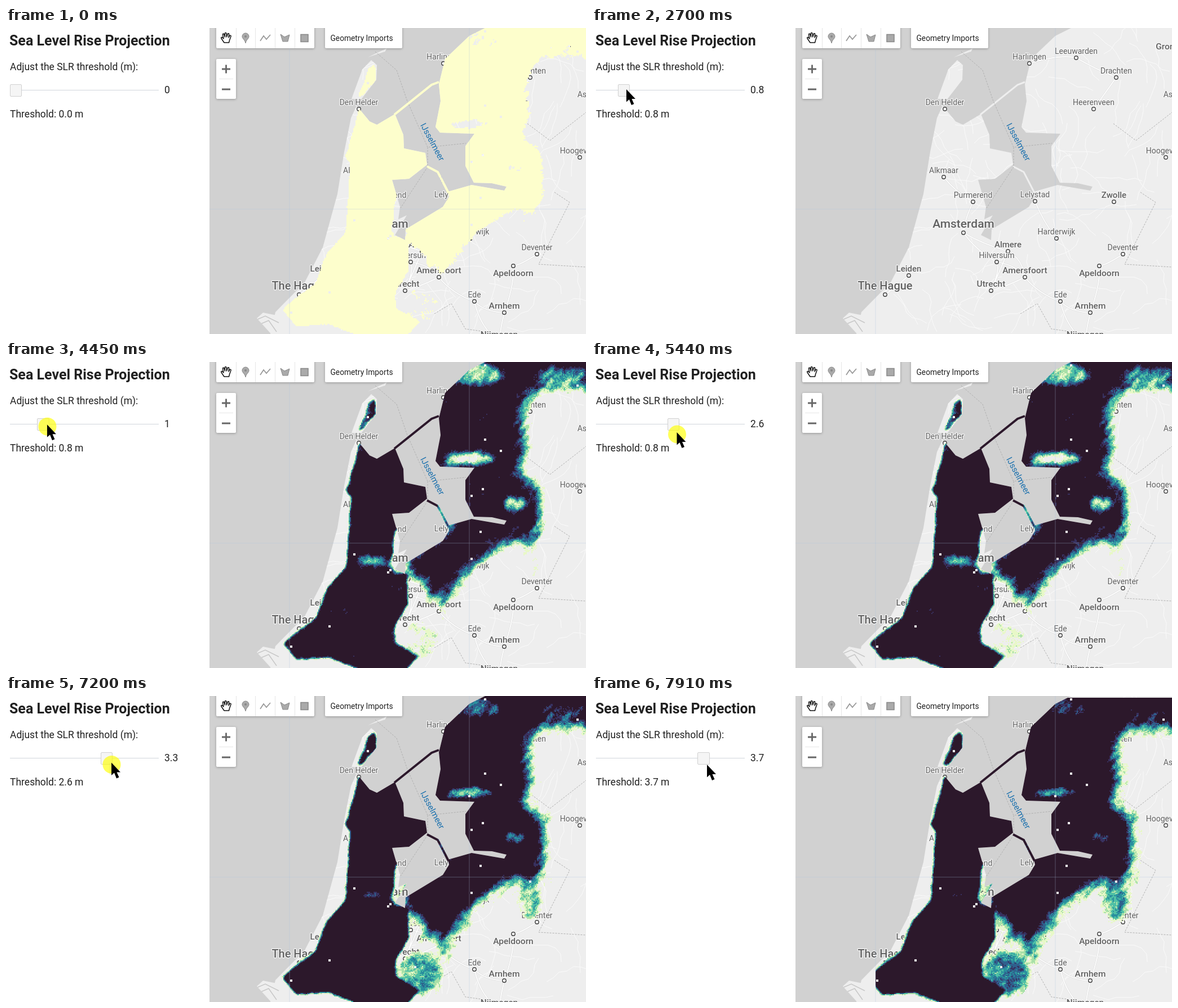
An HTML page with a canvas that plays this animation: 1029 px wide and 544 px high, repeating every 8000 ms.

```html
<!DOCTYPE html>
<html lang="en">
<head>
<meta charset="utf-8">
<title>Sea Level Rise Projection</title>
<style>
html, body { margin: 0; width: 100%; height: 100%; overflow: hidden; background: #fff; }
body { position: relative; font: 17.5px Roboto, sans-serif; color: #212121; }
#map, #flood, #top { position: absolute; left: 0; top: 0; width: 1029px; height: 544px; }
#panel { position: absolute; left: 0; top: 0; width: 360.5px; height: 544px; background: #fff; }
#panel > * { position: absolute; white-space: pre; line-height: 24px; margin: 0; left: 7px; }
#panel h1 { font-size: 25px; font-weight: 700; top: 11px; left: 6px; }
#track { top: 109.5px; width: 264px; height: 1.25px; background: #d0d5dc; }
#panel #knob { top: 99.5px; width: 19.5px; height: 20px; background: #f5f5f5; border: 1.25px solid #d0d0d0; border-radius: 2px; }
.box { position: absolute; background: #fff; border-radius: 2px; box-shadow: 0 1px 4px rgba(0,0,0,.3); }
</style>
</head>
<body>
<svg id="map" viewBox="0 0 1029 544"></svg>
<canvas id="flood" width="1029" height="544"></canvas>
<div class="box" style="left:373px;top:-4px;width:174px;height:40px"></div>
<div class="box" style="left:566px;top:-4px;width:137px;height:40px"></div>
<div class="box" style="left:373px;top:55px;width:35px;height:71px"></div>
<div id="panel">
  <h1>Sea Level Rise Projection</h1>
  <div style="top:57px">Adjust the SLR threshold (m):</div>
  <div id="track"></div>
  <div id="knob"></div>
  <div id="value" style="top:98px;left:281px">0</div>
  <div id="label" style="top:141px">Threshold: 0.0 m</div>
</div>
<svg id="top" viewBox="0 0 1029 544">
  <path d="M503 36V544M822 0V544M361 322H1029" stroke="#a9c0dc" stroke-opacity=".35"/>
  <path d="M408.5 0V36M442.5 0V36M477.5 0V36M512.5 0V36M378 90.5H403" stroke="#e6e6e6"/>
  <path d="M383 73H398M390.5 65.5V80.5M383 109H398" stroke="#666" stroke-width="2.8"/>
  <path d="M387 26L382 18.5Q381 16 383.500 16.500L386 19L384.5 12Q384.500 9.500 386.500 10.500L388.500 16L388.300 9.500Q389.500 7.500 391 9.500L391.500 16L393.500 10Q395.500 9 395.700 11L395 17L397 13.500Q399.500 12.500 399 15L396.500 22L395.500 26Z" fill="#fff" stroke="#111" stroke-width="1.5" stroke-linejoin="round"/>
  <path d="M425 27C424 21 419 19 419 15A6 6 0 0 1 431 15C431 19 426 21 425 27Z" fill="#aaa" stroke="#888"/>
  <circle cx="425" cy="15" r="2" fill="#888"/>
  <path d="M451 23L457 14L462 20L469 12" fill="none" stroke="#999" stroke-width="1.8"/>
  <path d="M487 11L494 16L503 12L500 24L491 24Z" fill="#aaa" stroke="#888"/>
  <path d="M523 11.5H536V24.5H523Z" fill="#aaa" stroke="#888" stroke-width="1.5"/>
  <text x="575.5" y="22.5" font-size="13.75" fill="#212121">Geometry Imports</text>
  <g id="mouse">
    <circle id="halo" cx=".5" cy="3.5" r="16" fill="#ff0" fill-opacity=".65"/>
    <path d="M0 0V22.5L5 18L9 28L13.5 26L9.5 17H16Z"/>
  </g>
</svg>
<script>
const W = 1029, H = 544, LOOP = 8000;
const $ = id => document.getElementById(id);

// ---------- geography: a few key points, roughened by noise ----------
const LAND = `M468 548L478 505L530 452L562 390L588 295L600 220L612 160L622 138
  L645 166L658 172L690 153L705 190L706 214L744 222L747 243L715 268L685 270L699 318L696 340L711 333L690 368L708 377
  L709 358L775 318L786 300L784 291L826 279L884 289L888 282L862 276L830 275L815 245V210L831 188L770 186L762 176
  L771 130L768 100L779 55L822 14L850 0V-9H1040V550Z
  M613 126L632 74L648 57L658 66L657 92L630 127Z M642 52L676 36L672 42Z
  M445 516L456 506L486 512L490 548H474Z`;
const DIKES = 'M689 154L755 101L768 96M747 246L766 256L785 293';
const WEST = `M712 378L685 362L690 305L700 290L765 265V215L700 140L626 143L612 200L602 228L611 240L605 340L603 362
  L570 402L548 455L490 500L515 530L572 526L660 560H700L732 524L692 500L690 470L714 430Z`;
const EAST = `M1080 -60H760L700 60V200H800V280L700 350V374L738 392L755 434L780 427L802 408L806 386L850 350L905 316
  L945 335L950 290V220L905 190L930 148L918 96L930 55L1000 44L1080 70Z`;
const TEXEL = 'M624 122L642 72L655 64L657 92L632 122Z';
// x, y, rx, ry, amount: low ground is added, high ground taken away
const LOW = [[735, 492, 38, 40, .35], [780, 448, 12, 28, .3], [930, 365, 22, 35, .3]];
const HIGH = [[835, 22, 48, 20, .5], [648, 353, 28, 9, .5], [822, 172, 45, 10, .75], [903, 253, 20, 12, .6],
  [985, 25, 50, 16, .35], [632, 95, 12, 30, .35], [695, 362, 12, 14, .9]];
const RAMP = ['#e8f8c8', '#a8e0a8', '#4fc0a5', '#2a8f9e', '#2f608d', '#38315f', '#2c182b']
  .map(c => [1, 3, 5].map(i => parseInt(c.slice(i, i + 2), 16)));

// name, x and y of the dot, text size, text drop below the dot (negative: above)
const CITIES = [['Den Helder', 626, 144], ['Harlingen', 776, 63], ['Leeuwarden', 859, 53], ['Drachten', 930, 88], ['Groningen', 1036, 45, 15.5],
  ['Assen', 1033, 130], ['Heerenveen', 890, 144], ['Hoogeveen', 1018, 230], ['Alkmaar', 624, 265], ['Purmerend', 676, 309],
  ['Lelystad', 786, 308], ['Zwolle', 926, 309, 15], ['Amsterdam', 659, 364, 21], ['Almere', 738, 397, 15], ['Hilversum', 718, 416],
  ['Amersfoort', 768, 443, 15.5], ['Utrecht', 708, 467, 15.5], ['Harderwijk', 824, 374], ['Deventer', 942, 402],
  ['Apeldoorn', 900, 423, 15.5, 18], ['Ede', 831, 486], ['Arnhem', 884, 506, 15.5], ['Nijmegen', 875, 557, 15.5],
  ['Leiden', 562, 440, 15], ['The Hague', 520, 474, 20]];

// ---------- noise ----------
function hash(x, y) {
  let n = Math.imul(x, 374761393) + Math.imul(y, 668265263);
  n = Math.imul(n ^ n >>> 13, 1274126177);
  return ((n ^ n >>> 16) >>> 0) / 4294967296;
}
function noise(x, y) {
  const i = Math.floor(x), j = Math.floor(y), u = x - i, v = y - j;
  const a = hash(i, j), b = hash(i + 1, j), c = hash(i, j + 1), d = hash(i + 1, j + 1);
  return a + (b - a) * u + (c - a + (a - b - c + d) * u) * v;
}

// ---------- base map ----------
const line = (d, w, c, extra = '') => `<path d="${d}" fill="none" stroke="${c}" stroke-width="${w}" ${extra}/>`;

function minorRoads() {
  let d = '';
  for (let i = 0; i < 130; i++) {
    let x = 540 + hash(i, 1) * 490, y = hash(i, 2) * 544, a = hash(i, 3) * 6.28;
    d += `M${x | 0} ${y | 0}`;
    for (let k = 0; k < 6; k++) {
      a += (hash(i, 10 + k) - .5) * 1.3;
      x += Math.cos(a) * 14; y += Math.sin(a) * 14;
      d += `L${x | 0} ${y | 0}`;
    }
  }
  return d;
}

// motorways join neighbouring cities with a slight bend
function motorways() {
  let d = '';
  CITIES.forEach(([, x, y], i) => CITIES.slice(0, i).forEach(([, p, q], j) => {
    if (Math.hypot(x - p, y - q) > 88) return;
    const bend = () => (hash(i, j) - .5) * 24;
    d += `M${x} ${y}Q${(x + p) / 2 + bend()} ${(y + q) / 2 - bend()} ${p} ${q}`;
  }));
  return d;
}

const dot = ([, x, y]) => `<circle cx="${x}" cy="${y}" r="3.2" fill="#fff" stroke="#444" stroke-width="1.4"/>`;
const name = ([s, x, y, size = 14, drop = -7]) =>
  `<text x="${x}" y="${y + (size > 16 ? drop - 2 : drop)}" font-size="${size}" font-weight="${size > 14 ? 500 : 400}">${s}</text>`;

$('map').innerHTML = `<rect width="${W}" height="${H}" fill="#d1d1d1"/><clipPath id="land"><path d="${LAND}"/></clipPath>
  <path d="${LAND}" fill="#eee"/>${line(DIKES, 3, '#eee')}
  <g clip-path="url(#land)">${line(minorRoads(), 1, '#fafafa')}${line(motorways(), 3, '#dedede')}${line(motorways(), 1.7, '#fff')}
  ${line('M446 518L460 512L484 524M452 526L466 520L480 540', 1.5, '#c8c8c8')}</g>
  ${line('M655 42L693 75L712 130L748 212L816 205M748 212V247L700 320M925 170L965 200L1029 150M973 292L1000 310L945 420L1029 425M760 508L790 490L815 535L880 544', 1, '#b0b0b0', 'stroke-dasharray="3 2"')}
  ${CITIES.map(dot).join('')}
  <g fill="#616161" stroke="#f5f5f5" stroke-width="2.5" stroke-linejoin="round" paint-order="stroke" text-anchor="middle">${CITIES.map(name).join('')}</g>
  <text transform="translate(752 205) rotate(62)" text-anchor="middle" font-size="15" fill="#1a70ae">IJsselmeer</text>`;

// ---------- flood: one ground field, read at a rising level ----------
function canvas(w, h) {
  const c = document.createElement('canvas');
  c.width = w; c.height = h;
  return c;
}
const fw = W + 1 >> 1, fh = H >> 1;

function groundField() {
  const g = canvas(fw, fh).getContext('2d');
  const soft = (px, shape, alpha = 1) => {
    g.filter = `blur(${px}px)`;
    g.globalAlpha = alpha;
    g.fill(shape);
  };
  const spot = ([x, y, rx, ry, amount]) => {
    const p = new Path2D();
    p.ellipse(x, y, rx, ry, 0, 0, 7);
    soft(3, p, amount);
  };
  g.scale(.5, .5);
  g.lineWidth = 4;
  soft(8, new Path2D(EAST));
  soft(1.5, new Path2D(WEST));
  soft(1, new Path2D(TEXEL));
  g.stroke(new Path2D(DIKES));
  LOW.forEach(spot);
  g.globalCompositeOperation = 'destination-out';
  HIGH.forEach(spot);

  return g.getImageData(0, 0, fw, fh).data.filter((_, i) => i % 4 === 3);
}

function landMask() {
  const c = canvas(W, H), g = c.getContext('2d');
  g.lineWidth = 4;
  g.fill(new Path2D(LAND));
  g.stroke(new Path2D(DIKES));
  return c;
}

const ground = groundField(), mask = landMask();

function floodLayer({ rise }) {
  const small = canvas(fw, fh), s = small.getContext('2d'), img = s.createImageData(fw, fh);
  for (let i = 0; i < fw * fh; i++) {
    const x = i % fw, y = i / fw | 0, a = ground[i] / 255;
    const rough = hash(x, y) * .2 + noise(x / 3, y / 3) * .35 + noise((x + y) / 5, (x - y) / 16) * .45 - .5;
    const islet = hash(x / 2 | 0, y / 2 | 0) > .997;
    const q = (a + rise + rough * .5 - .45) / .5;
    if (a < .04 || q < 0 || islet) continue;
    const c = rise ? RAMP[Math.min(6, q * 7 | 0)] : [253, 254, 204];
    img.data.set([...c, 255], i * 4);
  }
  s.putImageData(img, 0, 0);

  const out = canvas(W, H), o = out.getContext('2d');
  o.imageSmoothingEnabled = false;
  o.drawImage(small, 0, 0, fw * 2, fh * 2);
  o.globalCompositeOperation = 'destination-in';
  o.drawImage(mask, 0, 0);
  return out;
}

// ---------- timeline ----------
// at: slider released; edge, left: arrival of the late top and left tiles
const STAGES = [
  { at: -LOOP, press: -LOOP, shown: '0.0', rise: 0, edge: 0, left: 0 },
  { at: 2590, press: 1580, shown: '0.8', rise: .06, edge: 3600, left: 3780 },
  { at: 5570, press: 4050, shown: '2.6', rise: .27, edge: 6790, left: 5890 },
  { at: 7590, press: 6550, shown: '3.7', rise: .36, edge: LOOP, left: LOOP }
];
const LOAD = 320;
STAGES.forEach(s => s.layer = floodLayer(s));

// x, y, w, h, arrival
const tiles = ({ at, edge, left }) => [
  [822, 3, 207, 319, at + LOAD / 2], [503, 3, 319, 319, at + LOAD * .75], [503, 322, 526, 222, at + LOAD],
  [503, 0, 526, 3, edge], [361, 322, 142, 222, left]];

// time, pointer x, pointer y, slider value
const POINTER = [[580, 720, 458, 0], [1380, 23, 106, 0], [1580, 19.5, 103.5, 0], [1700, 20, 105, 0], [2490, 61, 109, .8], [4320, 61, 109, .8],
  [5300, 150.5, 125, 2.6], [5570, 150.5, 125, 2.6], [5890, 151.5, 111, 2.6], [6790, 152, 111, 2.6], [7400, 204, 122, 3.7], [LOOP, 204, 122, 3.7]];

function pointerAt(t) {
  const i = Math.max(1, POINTER.findIndex(r => r[0] > t));
  const a = POINTER[i - 1], b = POINTER[i], u = Math.max(0, (t - a[0]) / (b[0] - a[0]));
  return [1, 2, 3].map(k => a[k] + (b[k] - a[k]) * u);
}

const flood = $('flood').getContext('2d');
function drawFlood(stage, t) {
  flood.clearRect(0, 0, W, H);
  for (const [x, y, w, h, from] of tiles(stage))
    if (t >= from) flood.drawImage(stage.layer, x, y, w, h, x, y, w, h);
}

const start = performance.now();
function tick() {
  const t = (performance.now() - start) % LOOP;
  const stage = STAGES.filter(s => s.at <= t).pop();
  const [x, y, raw] = pointerAt(t), v = Math.round(raw * 10) / 10;
  drawFlood(stage, t);
  $('value').textContent = v;
  $('label').textContent = `Threshold: ${stage.shown} m`;
  $('knob').style.left = 6.5 + 48.85 * v + 'px';
  $('mouse').setAttribute('transform', `translate(${x} ${y})`);
  $('mouse').style.display = t < POINTER[0][0] ? 'none' : '';
  $('halo').style.display = STAGES.some(s => t >= s.press && t < s.at) ? '' : 'none';
  requestAnimationFrame(tick);
}
tick();
</script>
</body>
</html>
```
